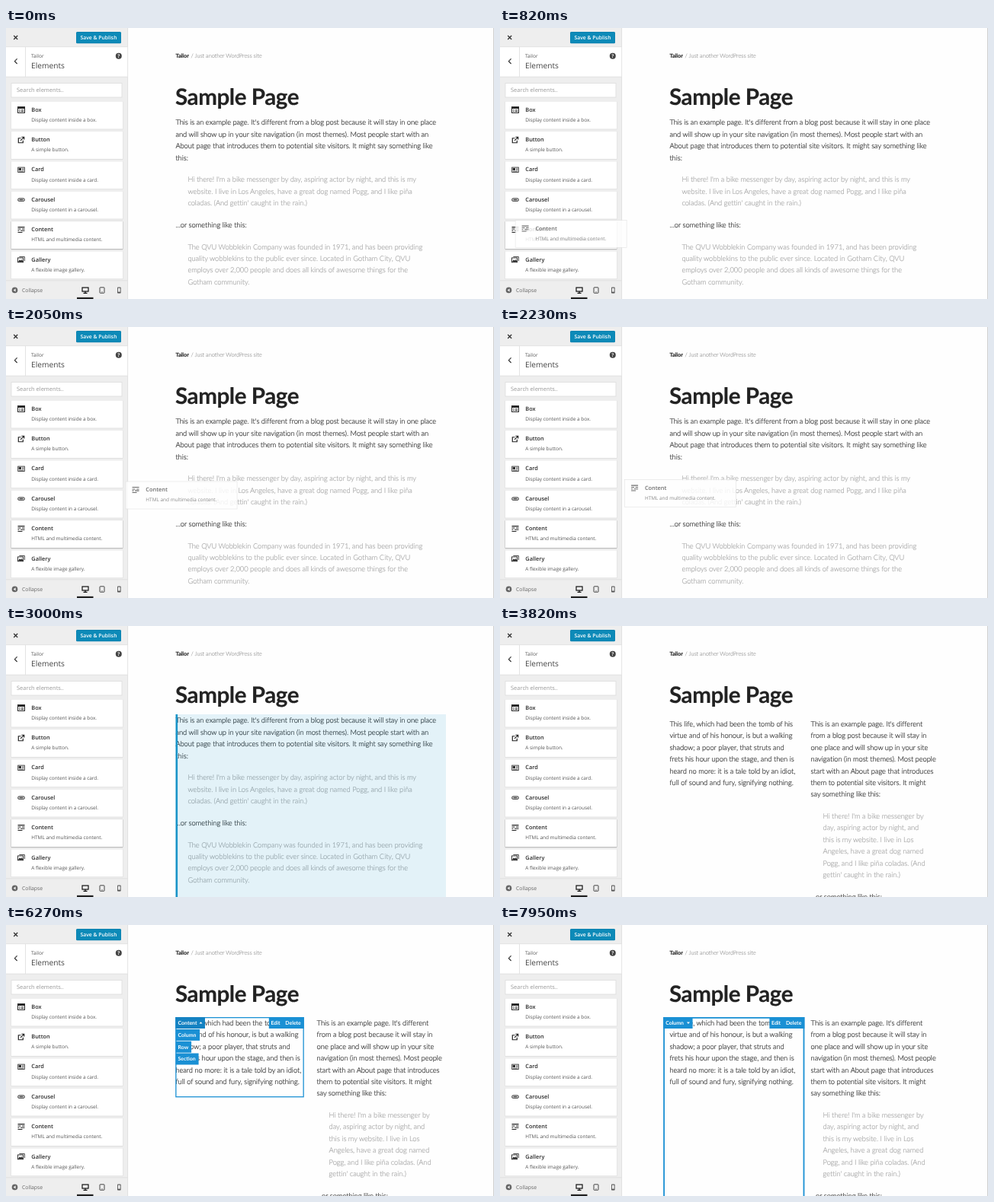
Animation of 640 by 356 pixels, one loop 8 s. Source, as an HTML page:

```html
<!DOCTYPE html>
<html lang="en">
<head>
<meta charset="utf-8">
<title>Page builder</title>
<style>
  html, body { margin: 0; width: 100%; height: 100%; overflow: hidden; background: #fff; }
  svg { display: block; width: 100%; height: 100%; text-rendering: geometricPrecision; }
  .ui { font-family: "Open Sans", sans-serif; }
  .page {
    font-family: Lato, sans-serif; font-weight: 300; font-size: 9.4px; letter-spacing: -.047px;
    color: #2b2b2b; fill: currentColor; stroke: currentColor; stroke-width: .17px;
  }
  .quote { color: #a6a6a6; }
  .title { font-size: 29.6px; font-weight: 700; letter-spacing: -.45px; color: #222; }
  .tag { font-family: Lato, sans-serif; font-weight: 700; font-size: 6.9px; fill: #fff; }
</style>
</head>
<body>
<svg id="stage" viewBox="0 0 640 356" xmlns="http://www.w3.org/2000/svg"></svg>
<script>
const LOOP = 8000;
const LINE = 15.4, PARA = 28.7;
const BLUE = '#1a90d4', DARK_BLUE = '#1482c2';
const CARD_TOP = 96.6, CARD_STEP = 39.35;

// When things switch, in ms
const GRAB = 700, ZONE_ON = 2260, RELEASE = 2560, DROP = 3160;
const SELECT = 4460, MENU = 5350, COLUMN = 6880;

// Drag path: time, x offset, y offset
const PATH = [[GRAB, 0, 0], [910, 28, -4], [1320, 85, -20], [1700, 124, -38],
              [2050, 150, -51], [2300, 158, -54], [RELEASE, 160, -55]];

const rect = (x, y, w, h, fill, more = '') =>
  `<rect x="${x}" y="${y}" width="${w}" height="${h}" fill="${fill}" ${more}/>`;
const text = (x, y, s, more = '') => `<text x="${x}" y="${y}" ${more}>${s}</text>`;
const line = (d, stroke, width = 1, more = '') =>
  `<path d="${d}" fill="none" stroke="${stroke}" stroke-width="${width}" ${more}/>`;
const group = (id, body, more = '') => `<g id="${id}" ${more}>${body}</g>`;

const icons = {
  Box: rect(-4.5, -3.8, 9, 7.6, 'none', 'stroke="#222"') + rect(-5, -4.2, 10, 2.6, '#222') +
    line('M-3 .2h1.5M-3 2h1.5M-.4 .2h3.6M-.4 2h3.6', '#222', .9),
  Button: line('M-.5 -2.2h-3.2v6h6v-3', '#222', 1.2) + line('M-1 1L3.4 -3.4M.4 -3.7h3.3v3.3', '#222', 1.2),
  Card: rect(-4.3, -3.2, 8.6, 6.4, 'none', 'stroke="#333" stroke-width=".9"') +
    rect(-3.4, -2.2, 3.4, 2.8, '#222') + line('M1 -1.4h2.4M1 0h2.4M-3.2 1.9h6.4', '#333', .8),
  Carousel: rect(-4.4, -1.8, 8.8, 3.6, '#ccc', 'rx="1.6" stroke="#333" stroke-width=".9"') +
    line('M-2.2 0h4.4', '#333', 1),
  Content: line('M-4.5 -3.4h9M-4.5 -1h4M1 -1h3.5M-4.5 1.2h2M-1 1.2h5.5M-4.5 3.5h6', '#222', 1.1),
  Gallery: line('M-2.6 -3.8h7v5.6', '#333', .9) +
    rect(-4.5, -2.4, 7, 5.8, '#fff', 'stroke="#222" stroke-width=".9"') +
    `<path d="M-4 2.8l2-3 1.5 1.6 1.2-1.8 1.6 3.2z" fill="#222"/>`
};

function cardBody(name, info) {
  return `<g transform="translate(13 11)">${icons[name]}</g>` +
    text(26.3, 13.2, name, 'font-size="7.35" font-weight="600" fill="#2a2a2a"') +
    text(26.3, 26.4, info, 'font-size="6.45" fill="#555"');
}

function card(name, info, i) {
  const hover = name === 'Content'
    ? group('hover', rect(-.8, -.2, 147.6, 38, '#000', 'opacity=".06" rx="1.5"') +
        rect(-.4, -.2, 146.8, 37.1, '#000', 'opacity=".1" rx="1"')) : '';
  return `<g transform="translate(7 ${CARD_TOP + i * CARD_STEP})">` +
    rect(-.4, -.2, 146.8, 37, '#000', 'opacity=".08"') + hover +
    rect(0, 0, 146, 36, '#fff') + cardBody(name, info) + '</g>';
}

function header() {
  return rect(0, 0, 160, 356, '#eee') +
    line('M10.2 10l5 5m0 -5l-5 5', '#333', 1.3) +
    rect(92, 5, 59, 15.3, '#0a7cab', 'rx="1.5"') + rect(92.4, 5.4, 58.2, 14.2, '#0d8ab8', 'rx="1.2"') +
    text(121.5, 15.2, 'Save &amp; Publish', 'font-size="6.8" font-weight="600" fill="#fff" text-anchor="middle"') +
    rect(0, 25, 160, 39, '#fff') +
    line('M0 24.7H160M0 64.2H160M25.5 25V64', '#ddd', .8) +
    line('M14.6 40.4l-3.2 3.3 3.2 3.3', '#333', 1.2) +
    text(33, 38.6, 'Tailor', 'font-size="6.5" fill="#555"') +
    text(33, 53.4, 'Elements', 'font-size="10.2" fill="#444"') +
    `<circle cx="147.8" cy="36.7" r="4" fill="#444"/>` +
    text(147.8, 39, '?', 'font-size="6.4" font-weight="700" fill="#fff" text-anchor="middle"') +
    rect(7, 72.4, 145, 18.6, '#fff', 'stroke="#ddd" stroke-width=".8"') +
    text(14, 84.3, 'Search elements..', 'font-size="7.5" fill="#999"');
}

function footer() {
  return rect(0, 332, 160, 24, '#eee') + line('M0 331.8H160', '#ddd', .8) +
    `<circle cx="11.5" cy="344.4" r="3.8" fill="#666"/><path d="M12.6 342.3v4.2l-3 -2.1z" fill="#eee"/>` +
    text(21, 347, 'Collapse', 'font-size="6.9" fill="#666"') +
    rect(100, 341, 8, 5, 'none', 'stroke="#111" stroke-width="1.2"') +
    line('M104 346v2M101.5 348.3h5', '#111', 1.2) + rect(93, 353.8, 21.5, 2.2, '#222') +
    rect(123, 340.8, 6, 7.4, 'none', 'stroke="#444" stroke-width="1" rx=".6"') + line('M125.3 346.8h1.4', '#444', .8) +
    rect(146, 340.4, 4.6, 8.2, '#555', 'rx=".8"') + rect(146.9, 341.6, 2.8, 5, '#eee');
}

function sidebar() {
  const list = [
    ['Box', 'Display content inside a box.'], ['Button', 'A simple button.'],
    ['Card', 'Display content inside a card.'], ['Carousel', 'Display content in a carousel.'],
    ['Content', 'HTML and multimedia content.'], ['Gallery', 'A flexible image gallery.']
  ];
  return header() + list.map(([n, d], i) => card(n, d, i)).join('') + footer() +
    line('M159.6 0V356', '#ddd', .8);
}

// Paragraphs stacked from a first baseline; those marked with > are quotes
function flow(x, y, paras) {
  let out = '';
  for (const p of paras) {
    const quote = p[0] === '>';
    const rows = p.replace('>', '').split('|');
    rows.forEach((s, i) => {
      out += text(x + (quote ? 16 : 0), +(y + i * LINE).toFixed(1), s, quote ? 'class="quote"' : '');
    });
    y += (rows.length - 1) * LINE + PARA;
  }
  return out;
}

const single = flow(222.4, 127.4, [
  "This is an example page. It's different from a blog post because it will stay in one place|" +
  'and will show up in your site navigation (in most themes). Most people start with an|' +
  'About page that introduces them to potential site visitors. It might say something like|this:',
  ">Hi there! I'm a bike messenger by day, aspiring actor by night, and this is my|" +
  'website. I live in Los Angeles, have a great dog named Pogg, and I like piña|' +
  "coladas. (And gettin' caught in the rain.)",
  '...or something like this:',
  '>The QVU Wobblekin Company was founded in 1971, and has been providing|' +
  'quality wobblekins to the public ever since. Located in Gotham City, QVU|' +
  'employs over 2,000 people and does all kinds of awesome things for the|Gotham community.'
]);

const columns = flow(222.4, 131.9, [
  'This life, which had been the tomb of his|virtue and of his honour, is but a walking|' +
  'shadow; a poor player, that struts and|frets his hour upon the stage, and then is|' +
  'heard no more: it is a tale told by an idiot,|full of sound and fury, signifying nothing.'
]) + flow(407.6, 131.9, [
  "This is an example page. It's different|from a blog post because it will stay in|" +
  'one place and will show up in your site|navigation (in most themes). Most people|' +
  'start with an About page that introduces|them to potential site visitors. It might|say something like this:',
  ">Hi there! I'm a bike messenger by|day, aspiring actor by night, and|this is my website. I live in Los|" +
  "Angeles, have a great dog named|Pogg, and I like piña coladas. (And|gettin' caught in the rain.)",
  '...or something like this:'
]);

const caret = (x, up) =>
  `<path d="M${x - 2} ${up ? 129.6 : 127.6}h4l-2 ${up ? -2.3 : 2.4}z" fill="#fff"/>`;

function tag(x, y, w, s, fill = BLUE) {
  return rect(x, y, w, 15, fill) + text(x + 3, y + 9.9, s, 'class="tag"');
}

function frameBox(x, y, w, h, name, labelWidth, weight) {
  return rect(x + weight / 2, y + weight / 2, w - weight, h - weight, 'none',
      `stroke="${BLUE}" stroke-width="${weight}"`) +
    tag(x, y, labelWidth, name) + rect(x + w - 46, y, 46, 15, BLUE) +
    text(x + w - 43.3, y + 9.9, 'Edit', 'class="tag"') +
    text(x + w - 24.5, y + 9.9, 'Delete', 'class="tag"');
}

const menu = tag(222.6, 121, 38.4, 'Content', DARK_BLUE) + caret(255.5, true) +
  [['Column', 31.5], ['Row', 20.5], ['Section', 30]]
    .map(([s, w], i) => tag(222.6, 136.9 + i * 15.8, w, s)).join('');

const stage = document.getElementById('stage');
stage.innerHTML = rect(0, 0, 640, 356, '#fefefe') + line('M639.6 0V356', '#bbb', .8) +
  `<g class="page">` +
    text(222.4, 38.8, 'Tailor', 'font-size="7.25" font-weight="700"') +
    text(242.6, 38.8, '/ Just another WordPress site', 'font-size="7.45" color="#a0a0a0"') +
    text(222, 101.2, 'Sample Page', 'class="title"') +
    group('single', single) + group('columns', columns) +
  '</g>' +
  group('zone', rect(222.5, 116, 354.5, 240, '#1896c8', 'opacity=".115"') + rect(222.5, 116, 2.6, 240, '#1a94c8')) +
  group('content', frameBox(222.2, 121, 168.6, 105.4, 'Content', 38.8, 1.3) + caret(255.5, false)) +
  group('menu', menu) +
  group('column', frameBox(214.2, 121, 185.2, 260, 'Column', 38.4, 1.8) + caret(247, false)) +
  `<g class="ui">` + sidebar() +
    group('ghost',
      rect(0, 0, 146, 36, '#fff', 'opacity=".84" stroke="#ddd" stroke-width=".6"') +
      `<g opacity=".68">${cardBody('Content', 'HTML and multimedia content.')}</g>`) +
  '</g>';

const parts = {};
stage.querySelectorAll('g[id]').forEach(g => parts[g.id] = g);
const show = (id, on) => parts[id].setAttribute('visibility', on ? 'visible' : 'hidden');

// Cubic Hermite through the path points
function along(t) {
  const last = PATH.length - 1;
  t = Math.min(Math.max(t, PATH[0][0]), PATH[last][0]);
  let i = 0;
  while (i < last - 1 && t > PATH[i + 1][0]) i++;
  const a = PATH[i], b = PATH[i + 1], span = b[0] - a[0], u = (t - a[0]) / span;
  const slope = (k, c) => {
    if (k === 0 || k === last) return 0;
    const p = PATH[k - 1], n = PATH[k + 1];
    return (n[c] - p[c]) / (n[0] - p[0]);
  };
  return [1, 2].map(c =>
    a[c] * (2 * u ** 3 - 3 * u * u + 1) + b[c] * (3 * u * u - 2 * u ** 3) +
    span * (slope(i, c) * (u ** 3 - 2 * u * u + u) + slope(i + 1, c) * (u ** 3 - u * u)));
}

function draw(t) {
  const [dx, dy] = along(t);
  parts.ghost.setAttribute('transform',
    `translate(${(7 + dx).toFixed(2)} ${(CARD_TOP + 4 * CARD_STEP + dy).toFixed(2)})`);
  show('ghost', t >= GRAB && t < RELEASE);
  show('zone', t >= ZONE_ON && t < DROP);
  show('single', t < DROP);
  show('columns', t >= DROP);
  show('hover', t < SELECT);
  show('content', t >= SELECT && t < COLUMN);
  show('menu', t >= MENU && t < COLUMN);
  show('column', t >= COLUMN);
}

const start = performance.now();
function tick() {
  draw((performance.now() - start) % LOOP);
  requestAnimationFrame(tick);
}
tick();
</script>
</body>
</html>
```
